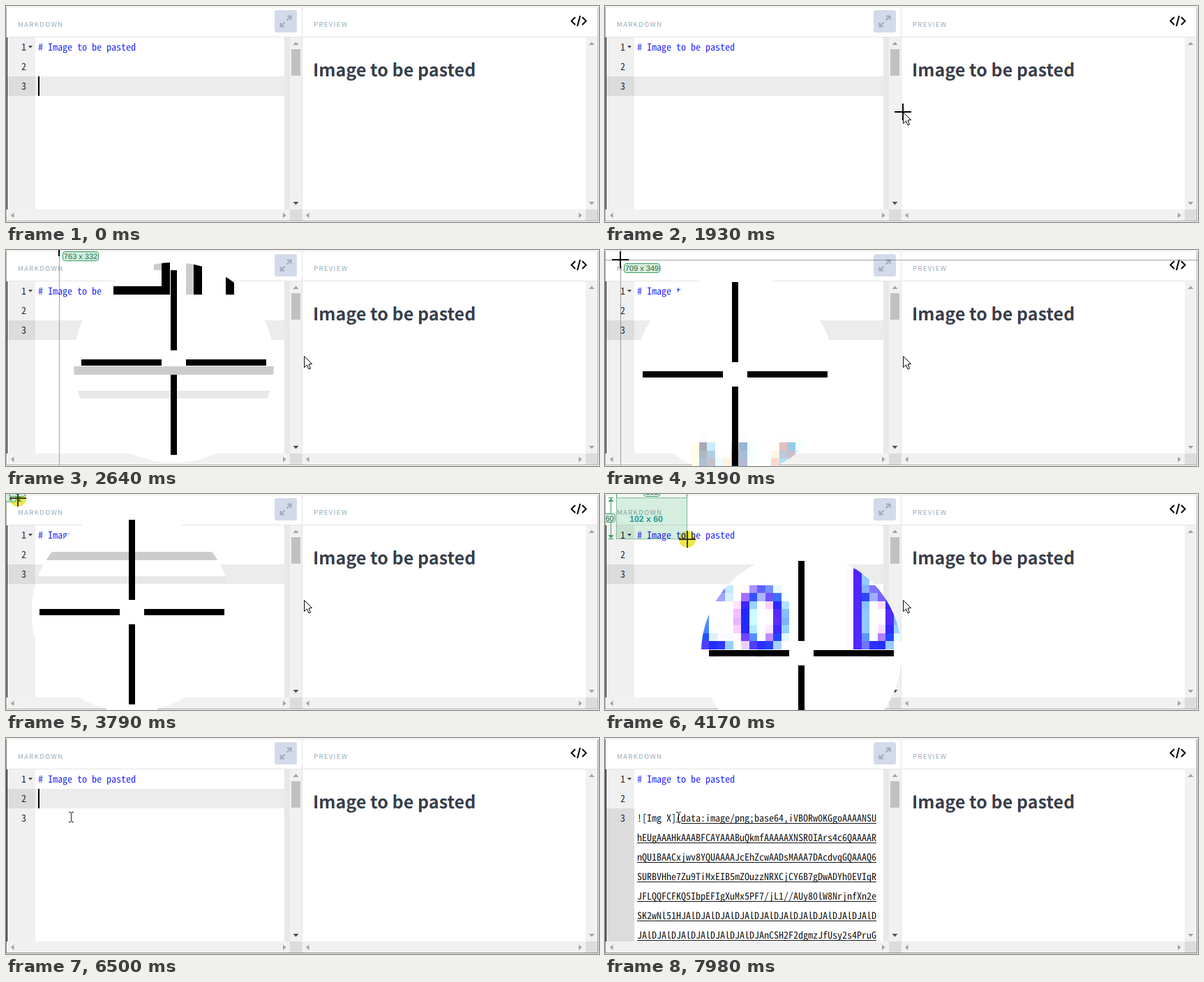
Recreate the animation shown at these times as an HTML page with a canvas. Size 850 by 310 pixels, loop 8000 ms.

```html
<!DOCTYPE html>
<html lang="en">
<head>
<meta charset="utf-8">
<title>Markdown editor capture</title>
<style>
  html, body { margin: 0; width: 100%; height: 100%; overflow: hidden; background: #fff; }
  canvas { display: block; }
</style>
</head>
<body>
<canvas id="stage" width="850" height="310"></canvas>
<script>
const LOOP = 8000, STEP = 78, BLINK = 540, ABOVE = 20, CELL = 7, LINE = 28;
const CAPTURE = 1930, LENS = 2010, DRAG = 3790, RELEASE = 5490;
const CLICK_LINE_2 = 5880, CLICK_LINE_3 = 7350, PASTE = 7980;

const stage = document.getElementById('stage').getContext('2d', { alpha: false });
const pageCanvas = document.createElement('canvas');
pageCanvas.width = 850;
pageCanvas.height = 310 + ABOVE;
const page = pageCanvas.getContext('2d', { alpha: false });
for (const c of [stage, page]) c.textRendering = 'geometricPrecision';

const SANS = '"Noto Sans CJK JP", "Noto Sans CJK", "Open Sans", sans-serif';
const ARIAL = '"Liberation Sans", sans-serif';
const MONO_FAMILY = '"Noto Sans Mono CJK JP", "DejaVu Sans Mono", monospace';
page.font = '100px ' + MONO_FAMILY;
const MONO = `${100 * CELL / page.measureText('0').width}px ${MONO_FAMILY}`;

const INK = [20, 20, 20], BLUE = [31, 39, 255], GRAY_BLUE = [147, 169, 181];
const GREEN = '#3a9a64';

// Key points: time, x, y
const POINTER = [[300, 792, 288], [1070, 603, 193], [1610, 427, 152]];
const CROSSHAIR = [
  [CAPTURE, 427, 152], [2640, 76, -3], [2950, 44, -5], [3190, 22, 14],
  [3640, 16, 5], [DRAG, 16, 5], [4170, 117, 64], [4410, 136, 73]
];
const IBEAM = [[RELEASE, 137, 74], [CLICK_LINE_2, 88, 95], [6350, 88, 95], [6500, 93, 113], [6730, 105, 113]];

const PASTED = [
  ['data', 'image/png;base64,iVBORw0KGgoAAAANSU'].join(':'),
  'hEUgAAAHkAAABFCAYAAABuQkmfAAAAAXNSR0IArs4c6QAAAAR',
  'nQU1BAACxjwv8YQUAAAAJcEhZcwAADsMAAA7DAcdvqGQAAAQ6',
  'SURBVHhe7Zu9TiMxEIB5mZOuzzNRXCjCY6B7gDwADYh0EVIqR',
  'JFLQQFCFKQ5IbpEFIgXuMx5PF7/jL1//AUy80lW8NrjnfXn2e',
  'SK2wNl51HJ' + 'AlDJ'.repeat(9) + 'AlD',
  'J' + 'AlDJ'.repeat(6) + 'AnCSH2F2dgmzJfUsy2s4PruG'
];

function along(track, t) {
  const i = track.findLastIndex(point => point[0] <= t);
  const [t0, x0, y0] = track[i], [t1, x1, y1] = track[i + 1] || [Infinity, x0, y0];
  const steps = Math.max(1, Math.round((t1 - t0) / STEP));
  const k = t1 < Infinity ? Math.floor((t - t0) / (t1 - t0) * steps) / steps : 0;
  return [Math.round(x0 + (x1 - x0) * k), Math.round(y0 + (y1 - y0) * k)];
}

function box(c, color, x0, y0, x1, y1) {
  c.fillStyle = color;
  c.fillRect(x0, y0, x1 - x0, y1 - y0);
}

// Text with subpixel colour fringes: one layer per channel, a third of a pixel apart
function label(c, text, x, y, font, rgb, align = 'left', spacing = 0) {
  c.font = font;
  c.textAlign = align;
  c.letterSpacing = spacing + 'px';
  c.globalCompositeOperation = 'multiply';
  rgb.forEach((value, channel) => {
    const layer = [255, 255, 255];
    layer[channel] = value;
    c.fillStyle = `rgb(${layer})`;
    c.fillText(text, x + (1 - channel) / 3, y);
  });
  c.globalCompositeOperation = 'source-over';
}

function polygon(c, color, points) {
  c.beginPath();
  points.forEach(([x, y]) => c.lineTo(x, y));
  c.closePath();
  c.fillStyle = color;
  c.fill();
}

function lines(c, color, width, ...paths) {
  c.strokeStyle = color;
  c.lineWidth = width;
  for (const points of paths) {
    c.beginPath();
    points.forEach(([x, y]) => c.lineTo(x, y));
    c.stroke();
  }
}

// quarter: 0 up, 1 right, 2 down, 3 left
function arrow(c, x, y, quarter, color) {
  c.save();
  c.translate(x, y);
  c.rotate(quarter * Math.PI / 2);
  polygon(c, color, [[-4, 2], [0, -2.5], [4, 2]]);
  c.restore();
}

function scrollbars(c, left, right, downColor) {
  const gray = '#a3a3a3';
  box(c, '#f1f1f1', right - 17, 45, right, 292);
  box(c, '#f1f1f1', left, 292, right - 17, 308);
  box(c, '#dcdcdc', right - 17, 292, right, 308);
  arrow(c, right - 8.5, 54, 0, gray);
  arrow(c, right - 8.5, 283, 2, downColor);
  arrow(c, left + 7.5, 300.5, 3, gray);
  arrow(c, right - 25, 300.5, 1, gray);
}

// Bottom of the heading that sits just above the stage
function drawAbove(c) {
  box(c, '#ccc', 0, -2, 850, -1);
  box(c, '#000', 69, -12, 76, -11);
  for (const x of [75, 79, 83]) {
    box(c, '#000', x, -16, x + 1, -11);
    box(c, '#ccc', x - 1, -16, x, x === 79 ? -11 : -14);
  }
}

function drawEditor(c, t) {
  const pasted = t >= PASTE;
  const active = t >= CLICK_LINE_2 && t < CLICK_LINE_3 ? 2 : 3;
  const top = 17 + LINE * active;
  box(c, '#f0f0f0', 2, 45, 42, 292);
  box(c, '#dcdcdc', 2, top, 42, pasted ? 292 : top + LINE);
  if (!pasted) box(c, '#ececec', 42, top, 399, top + LINE);
  box(c, '#e8e8e8', 399, 45, 407, 292);
  box(c, '#111', 1, 45, 2, 292);

  for (let n = 1; n <= 3; n++) label(c, n, 29, 36 + LINE * n, MONO, [45, 45, 45], 'right');
  polygon(c, '#444', [[32, 57], [38, 57], [35, 60.5]]);
  label(c, '# Image to be pasted', 46, 64, MONO, BLUE);

  if (pasted) {
    label(c, '![Img X](', 46, 120, MONO, INK);
    PASTED.forEach((text, i) => {
      const x = i ? 46 : 109, y = 120 + LINE * i;
      label(c, text, x, y, MONO, INK);
      box(c, '#111', x, y + 2, x + text.length * CELL, y + 3);
    });
  } else if (Math.floor(t / BLINK) % 2 === 0) {
    box(c, '#000', 46, top, 48, top + LINE);
  }
}

function drawPage(c, t) {
  c.setTransform(1, 0, 0, 1, 0, ABOVE);
  box(c, '#fff', 0, -ABOVE, 850, 310);
  drawAbove(c);
  drawEditor(c, t);
  scrollbars(c, 2, 424, '#505050');
  box(c, '#c1c1c1', 409, 62, 422, 100);
  scrollbars(c, 425, 848, '#a3a3a3');

  box(c, '#e8e8e8', 0, 1, 849, 2);
  box(c, '#e5e5e5', 1, 44, 848, 45);
  box(c, '#e2e2e2', 424, 2, 425, 308);
  const frame = t >= RELEASE ? '#808080' : '#ababab';
  box(c, frame, 0, 2, 1, 309);
  box(c, frame, 848, 2, 849, 309);
  box(c, frame, 0, 308, 849, 309);

  label(c, 'MARKDOWN', 17, 30, '9.6px ' + SANS, GRAY_BLUE, 'left', 1.3);
  label(c, 'PREVIEW', 441, 30, '9.6px ' + SANS, GRAY_BLUE, 'left', 1.3);
  label(c, 'Image to be pasted', 440, 101, '600 25.1px ' + SANS, [55, 61, 73]);

  c.fillStyle = '#d3daea';
  c.beginPath();
  c.roundRect(385, 6, 32, 32, 3);
  c.fill();
  lines(c, '#a0aabf', 2,
    [[402.5, 20.5], [408, 15]], [[403, 14.5], [408.5, 14.5], [408.5, 20]],
    [[399.5, 23.5], [394, 29]], [[393.5, 24], [393.5, 29.5], [399, 29.5]]);
  lines(c, '#000', 2,
    [[816, 16], [810.5, 21.5], [816, 27]], [[826, 16], [831.5, 21.5], [826, 27]], [[823, 14], [819, 29]]);
}

function drawPointer(c, x, y) {
  polygon(c, '#fff', [[0, 0], [0, 16], [4, 12.5], [6.5, 18.5], [9, 17.5], [6.5, 11.5], [11, 11]]
    .map(([dx, dy]) => [x + .5 + dx, y + .5 + dy]));
  c.strokeStyle = '#000';
  c.lineWidth = 1;
  c.stroke();
}

function drawIbeam(c, x, y) {
  const ink = '#222';
  box(c, ink, x, y - 6, x + 1, y + 7);
  for (const end of [y - 7, y + 7]) {
    box(c, ink, x - 3, end, x, end + 1);
    box(c, ink, x + 1, end, x + 4, end + 1);
  }
}

function drawLens(c, x, y) {
  const cx = x + 164.5, cy = y + 164.5, r = 143.75;
  c.save();
  c.beginPath();
  c.arc(cx, cy, r, 0, 7);
  c.clip();
  box(c, '#fff', cx - r, cy - r, cx + r, cy + r);
  c.imageSmoothingEnabled = false;
  c.drawImage(pageCanvas, x - 12, y - 12 + ABOVE, 25, 25, cx - r, cy - r, 2 * r, 2 * r);
  c.restore();
  for (const from of [-132.5, 17.5]) {
    box(c, '#000', cx + from, cy - 4.5, cx + from + 115, cy + 4.5);
    box(c, '#000', cx - 4.5, cy + from, cx + 4.5, cy + from + 115);
  }
}

function drawTag(c, text, x, y, w, h) {
  c.beginPath();
  c.roundRect(x + .5, y + .5, w - 1, h - 1, 3);
  c.fillStyle = '#d5eedd';
  c.fill();
  c.strokeStyle = GREEN;
  c.lineWidth = 1;
  c.stroke();
  label(c, text, x + w / 2, y + h / 2 + 4, '11px ' + ARIAL, [31, 111, 74], 'center');
}

function drawSelection(c, x, y) {
  const left = 16, top = 5, right = x + 1, bottom = y + 1;
  const w = right - left, h = bottom - top;
  c.globalCompositeOperation = 'multiply';
  box(c, '#d5eedf', left, top, right, bottom);
  c.fillStyle = '#efe64a';
  c.beginPath();
  c.arc(right, bottom, 12, 0, 7);
  c.fill();
  c.globalCompositeOperation = 'source-over';

  c.strokeStyle = '#83b99c';
  c.lineWidth = 1;
  c.strokeRect(left + .5, top + .5, w - 1, h - 1);
  label(c, `${w} x ${h}`, left + w / 2 - 8, top + h / 2 + 5, 'bold 12.3px ' + ARIAL, [40, 160, 164], 'center');

  for (const edge of [left, right - 1]) box(c, GREEN, edge, 0, edge + 1, top);
  for (const edge of [top, bottom - 1]) box(c, GREEN, 5, edge, 12, edge + 1);
  box(c, GREEN, 8, top, 9, bottom);
  arrow(c, 8.5, top + 4, 0, GREEN);
  arrow(c, 8.5, bottom - 4, 2, GREEN);
  drawTag(c, h, -2, top + h / 2 - 7, 17, 13);
  drawTag(c, w, left + w / 2 - 12, -10, 24, 14);
}

function drawGuides(c, x, y) {
  c.setLineDash([1, 1]);
  lines(c, '#444', 1, [[x + .5, 0], [x + .5, 310]], [[0, y + .5], [850, y + .5]]);
  c.setLineDash([]);
  drawTag(c, `${x + 687} x ${y + 335}`, x + 5, y + 5, 52, 14);
}

function drawCapture(c, t) {
  const [x, y] = along(CROSSHAIR, t);
  const dragging = t >= DRAG;
  if (dragging) drawSelection(c, x, y);
  if (t >= LENS) {
    drawLens(c, x, y);
    if (!dragging) drawGuides(c, x, y);
  }
  const cx = x + dragging, cy = y + dragging, ink = dragging ? '#3c3a10' : '#000';
  box(c, ink, cx - 12, cy - 1, cx + 12, cy + 1);
  box(c, ink, cx - 1, cy - 12, cx + 1, cy + 12);
}

function render(t) {
  const capturing = t >= CAPTURE && t < RELEASE;
  drawPage(page, capturing ? CAPTURE : t);
  stage.drawImage(pageCanvas, 0, -ABOVE);
  if (t >= POINTER[0][0] && t < RELEASE) drawPointer(stage, ...along(POINTER, t));
  if (capturing) drawCapture(stage, t);
  if (t >= RELEASE) drawIbeam(stage, ...along(IBEAM, t));
}

const start = performance.now();
function tick() {
  render((performance.now() - start) % LOOP);
  requestAnimationFrame(tick);
}
tick();
</script>
</body>
</html>
```
